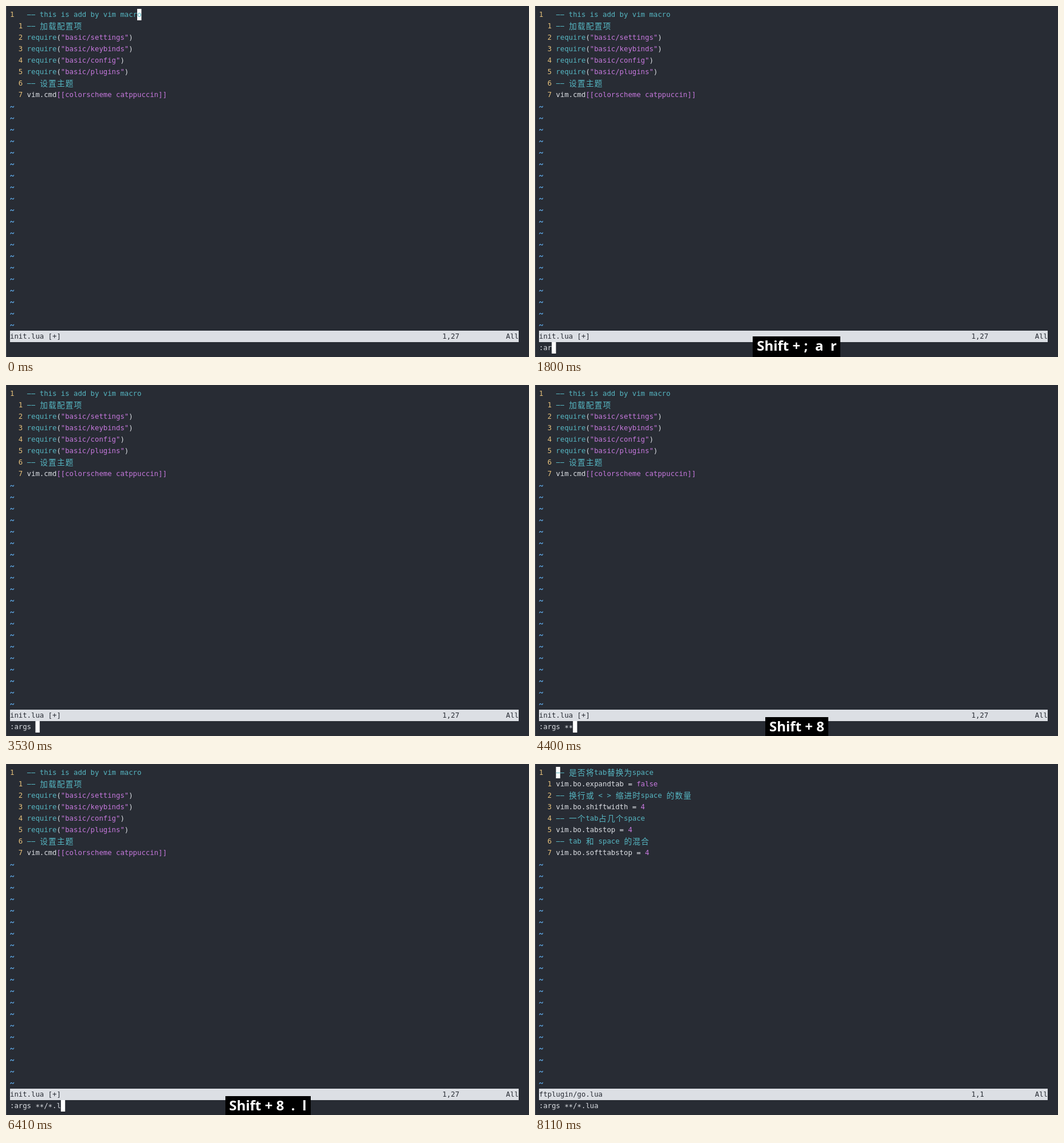
Write an HTML page with a canvas that moves like this. It is 913 px wide and 613 px high and loops after 8.32 s.

```html
<!DOCTYPE html>
<html lang="zh-CN">
<head>
<meta charset="utf-8">
<title>Vim args</title>
<style>
html, body { margin: 0; width: 100%; height: 100%; overflow: hidden; background: #282c34; }
canvas { display: block; }
</style>
</head>
<body>
<canvas id="stage" width="913" height="613"></canvas>
<script>
const ctx = document.getElementById("stage").getContext("2d");
const LOOP = 8320, CELL = 7.4, ROW = 20.07, LEFT = 7, TOP = 5;
const MONO = '12.3px "DejaVu Sans Mono", monospace';
const WIDE = '13.7px "Noto Sans CJK SC", "Noto Sans CJK", sans-serif';
const BOLD = 'bold 24px "Open Sans", "Noto Sans CJK SC", "Noto Sans CJK", sans-serif';
const BG = "#282c34", FG = "#dcdfe4", CYAN = "#56b6c2", PINK = "#c678dd", YELLOW = "#e5c07b", BLUE = "#61afef";
const COMMAND = ":args **/*.lua";

const initFile = {
  name: "init.lua [+]", position: "1,27", cursor: 30,
  lines: [
    "-- this is add by vim macro", "-- 加载配置项",
    'require("basic/settings")', 'require("basic/keybinds")',
    'require("basic/config")', 'require("basic/plugins")',
    "-- 设置主题", "vim.cmd[[colorscheme catppuccin]]"
  ]
};
const goFile = {
  name: "ftplugin/go.lua", position: "1,1", cursor: 4,
  lines: [
    "-- 是否将tab替换为space", "vim.bo.expandtab = false",
    "-- 换行或 < > 缩进时space 的数量", "vim.bo.shiftwidth = 4",
    "-- 一个tab占几个space", "vim.bo.tabstop = 4",
    "-- tab 和 space 的混合", "vim.bo.softtabstop = 4"
  ]
};

// start time, pressed keys, characters typed in the command line
const steps = [
  [0, "", 0], [400, "Shift", 0], [980, "Shift + ;", 0], [1060, "Shift + ;", 1],
  [1510, "Shift + ;  a", 1], [1600, "Shift + ;  a", 2],
  [1720, "Shift + ;  a  r", 2], [1800, "Shift + ;  a  r", 3],
  [1890, "a  r  g", 3], [1960, "a  r  g", 4], [2030, "r  g  s", 4], [2100, "r  g  s", 5],
  [2460, "g  s", 5], [2600, "g  s  空格键", 5], [2670, "g  s  空格键", 6],
  [2800, "s  空格键", 6], [2970, "空格键", 6], [3530, "", 6],
  [3870, "Shift + 8", 6], [3950, "Shift + 8", 7], [4400, "Shift + 8", 8],
  [5100, "Shift + 8  /", 9], [5250, "/", 9], [5300, "/  Shift", 9], [5580, "/  Shift + 8", 10],
  [5990, "Shift + 8", 10], [6060, "Shift + 8  .", 10], [6130, "Shift + 8  .", 11],
  [6330, "Shift + 8  .  l", 11], [6410, "Shift + 8  .  l", 12],
  [6530, ".  l  u", 12], [6600, ".  l  u", 13], [6680, "l  u  a", 14],
  [6940, "u  a", 14], [7170, "u  a  Enter", 14], [7410, "a  Enter", 14],
  [7530, "Enter", 14], [8110, "", 14]
];
const ENTERED = 7250, OPENED = 7470;

function rect(x, y, w, h, color) {
  ctx.fillStyle = color;
  ctx.fillRect(x, y, w, h);
}

// Draws on the terminal grid and returns the next free column.
function put(text, col, row, color) {
  ctx.fillStyle = color;
  for (const ch of text) {
    const x = LEFT + col * CELL, y = Math.round(TOP + row * ROW);
    const wide = ch > "\u2e80";
    ctx.font = wide ? WIDE : MONO;
    if (ch === "-") ctx.fillRect(x + 0.3, y + 10, 6.7, 1);
    else ctx.fillText(ch, wide ? x + 0.5 : x, y + (ch === "*" ? 16 : wide ? 15 : 14));
    col += wide ? 2 : 1;
  }
  return col;
}

function putCode(line, row) {
  let col = 4;
  for (const part of line.split(/(^--.*|require|"[^"]*"|\[\[.*\]\]|false|\d)/)) {
    const color = /^(--|require)/.test(part) ? CYAN : /^("|\[\[|false|\d)/.test(part) ? PINK : FG;
    col = put(part, col, row, color);
  }
}

function putCursor(col, row) {
  rect(LEFT + col * CELL, Math.round(TOP + row * ROW), CELL, 20, "#fff");
}

function putTilde(row) {
  const y = TOP + row * ROW + 10.5;
  ctx.beginPath();
  ctx.moveTo(LEFT + 0.7, y + 1.5);
  ctx.bezierCurveTo(LEFT + 2.2, y - 5, LEFT + 5.2, y + 5, LEFT + 6.7, y - 1.5);
  ctx.strokeStyle = BLUE;
  ctx.lineWidth = 1.2;
  ctx.stroke();
}

function drawKeys(text) {
  if (!text) return;
  ctx.font = BOLD;
  const size = ctx.measureText(text), pad = 7.5;
  const descent = Math.max(size.actualBoundingBoxDescent, text.includes("/") ? 4 : 0);
  const width = size.width + 14;
  const height = Math.round(size.actualBoundingBoxAscent + descent + 2 * pad);
  const x = 457 - width / 2;
  rect(Math.round(x), 613 - height, Math.round(width), height, "#000");
  ctx.fillStyle = "#fff";
  ctx.fillText(text, x + 7, Math.floor(613 - pad - descent));
}

function draw(time) {
  const [, keys, typed] = steps.findLast(step => step[0] <= time);
  const file = time < OPENED ? initFile : goFile;
  rect(0, 0, 913, 613, BG);
  rect(0, 0, 1, 613, "#4b4f57");
  rect(LEFT, 567, 120 * CELL, 20, FG);

  if (!typed || time >= OPENED) putCursor(file.cursor, 0);
  else putCursor(time < ENTERED ? typed : 0, 29);

  file.lines.forEach((line, row) => {
    put(String(row || 1), row ? 2 : 0, row, YELLOW);
    putCode(line, row);
  });
  for (let row = 8; row < 28; row++) putTilde(row);
  put(file.name, 0, 28, BG);
  put(file.position, 102, 28, BG);
  put("All", 117, 28, BG);
  put(COMMAND.slice(0, typed), 0, 29, FG);
  drawKeys(keys);
}

function tick() {
  draw(performance.now() % LOOP);
  requestAnimationFrame(tick);
}
tick();
</script>
</body>
</html>
```
